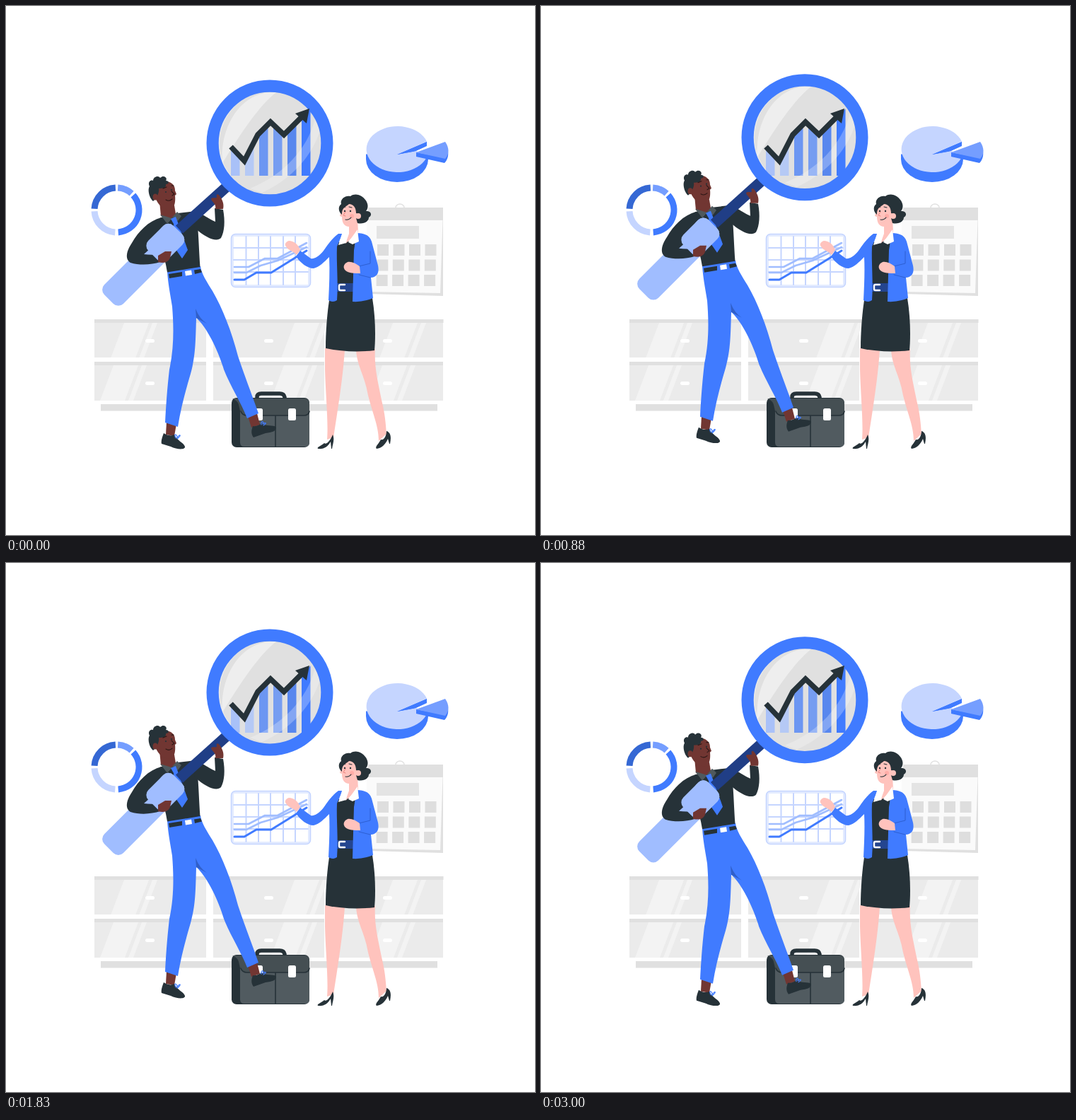
Write an HTML page that moves like this. It is 748 by 748 pixels and loops after 3040 ms.

```html
<!DOCTYPE html>
<html lang="en">
<head>
<meta charset="utf-8">
<title>Business analysis</title>
<style>
html, body { margin: 0; width: 100%; height: 100%; overflow: hidden; background: #fff; }
svg { display: block; width: 100vw; height: 100vh; }
.blue { fill: #407bff; }
.ink { fill: #263238; }
.tan { fill: #713632; }
.rose { fill: #ffc3bd; }
.line { fill: none; stroke-linecap: round; stroke-linejoin: round; }
</style>
</head>
<body>
<svg viewBox="0 0 748 748">
  <defs>
    <clipPath id="glass"><circle cx="373" cy="194" r="75"/></clipPath>
    <clipPath id="under"><path d="M318 199L337 219L356 182L374 164L393 182L431 145V240H318Z"/></clipPath>
  </defs>

  <g id="cabinet"></g>

  <g id="calendar">
    <path d="M551 285a6 5 0 0 1 12 0" class="line" stroke="#e0e0e0" stroke-width="1.5"/>
    <path d="M512 285H618V410L512 407Z" fill="#e0e0e0"/>
    <path d="M510 303H617.5L614 406L510 404Z" fill="#fafafa"/>
    <path d="M524 311H584V329H524Z" fill="#e4e4e4"/>
  </g>

  <g id="donut" class="line" stroke-width="9" style="stroke-linecap:butt"></g>

  <g id="pie">
    <path d="M509 209.500V216.500A44 32.500 0 0 0 597 216.500V209.500Z" class="blue"/>
    <path d="M553 210L595 192V199L566 210Z" class="blue"/>
    <path d="M553 210L595 191.500A44 32.500 0 1 0 597 208L580 205Z" fill="#c5d5ff"/>
    <path d="M553 210L595 192V198L580 205Z" class="blue"/>
    <path d="M580 205L595 198L598 203L597 210Z" fill="#fff"/>
    <path d="M580 207V213L620 222C624 218 626 212 625 206L619 214Z" class="blue"/>
    <path d="M580 207L621 192C627 201 627 209 621 216Z" fill="#759eff"/>
  </g>

  <g id="board" class="line">
    <rect x="318.5" y="322.5" width="112" height="75" rx="6" fill="#e3ebff" stroke="#c5d5ff" stroke-width="1.6"/>
    <rect x="322" y="326" width="105" height="68" fill="#fff"/>
    <path d="M339.500 326v68m17.500-68v68m17-68v68m18-68v68m17-68v68M322 342h105M322 359h105M322 376h105" stroke="#c5d5ff" stroke-width="2"/>
    <path d="M323 369H343L366 357H384L425 335M323 377H340L360 367L384 360L425 341" stroke="#a0bdff" stroke-width="2.6"/>
    <path d="M323 387H337L354 377H375L425 346" stroke="#407bff" stroke-width="3"/>
  </g>

  <g id="bag">
    <path d="M355 557V553Q355 548 361 548H387Q393 548 394 553V557" class="line" stroke="#263238" stroke-width="5.500"/>
    <rect x="319" y="554" width="110" height="70" rx="7" class="ink"/>
    <path d="M331 572H429V617Q429 623 423 623H337Q331 623 331 617Z" fill="#515b60"/>
    <path d="M320 555H422Q429 555 429 562V572Q428 579 421 579H339Q331 578 330 568Q329 558 320 555Z" fill="#454f53"/>
    <path d="M332 573Q334 579 341 579H421Q428 579 429 573M381 579V623" class="line" stroke="#263238" stroke-width="1.6"/>
    <rect x="352" y="569" width="11" height="17" rx="2.500" fill="#fff"/>
    <rect x="399" y="569" width="11" height="17" rx="2.500" fill="#fff"/>
  </g>

  <g id="man">
    <!-- feet and trousers -->
    <path d="M227 588L241 591L238 608L226 606Z" class="tan"/>
    <path d="M342 580L355 576L359 592L347 596Z" class="tan"/>
    <path d="M223 604C229 608 234 608 238 606C241 614 252 618 253 623C254 628 241 627 233 623L220 619C219 615 221 609 223 604Z" class="ink"/>
    <path d="M349 594C354 595 359 592 361 590C368 595 378 592 382 595C383 601 376 603 367 604L350 610C346 605 347 599 349 594Z" class="ink"/>
    <path d="M240 611C236 603 243 606 242 611C246 604 249 607 242 612M361 592C360 585 366 588 363 591C368 588 369 590 364 593" class="line" stroke="#407bff" stroke-width="1.2"/>
    <path d="M228 375L275 368C276 378 284 390 292 403C306 427 319 460 328 495C338 525 348 550 357 576L341 583C333 562 317 537 308 514C301 490 285 455 269 441C268 476 268 495 261 520C253 547 247 570 243 595L225 589C226 567 228 540 231 514C238 483 237 450 235 425C232 406 229 392 228 375Z" class="blue"/>
    <path d="M268 428Q274 443 284 449L269 441Z" fill="#305fc9"/>
    <path d="M230 379L249 376V382L231 385ZM266 373.500L275 372L277 376.500L267 379Z" class="ink"/>
    <path d="M253 375L262 373.500L263 380L254 381.500Z" fill="#fff"/>

    <!-- torso, neck and head -->
    <path d="M217 300L234 294L268 290C272 306 272 330 274.500 369L228 376.500C226 363 222 350 219 338Z" class="ink"/>
    <path d="M266 291C279 293 287 302 296 305L295 286L307 288C310 304 309 319 304 328C298 334 284 329 267 314Z" class="ink"/>
    <path d="M217 276L219 297L232 302L240 294L238 282Z" class="tan"/>
    <path d="M209 262C211 250 224 245 233 250C238 253 239 257 239 261L241 266L239 268C240 278 238 287 231 288C222 288 211 279 209 262Z" class="tan"/>
    <path d="M208 276C202 271 200 259 203 255C200 250 204 245 208 247C208 241 216 239 218 243C223 238 229 243 226 247C231 247 231 252 226 252C227 257 222 258 216 258C217 264 214 267 213 271Z" class="ink"/>
    <ellipse cx="211" cy="270" rx="3.500" ry="4.500" class="tan"/>
    <path d="M222 258L227 256M234 254L237 254M234 262L238 266L235 268M226 274Q231 277 235 273" class="line" stroke="#2b1716" stroke-width="1.1"/>
    <circle cx="226" cy="263" r="1.100" class="ink"/><circle cx="234" cy="260" r="1.100" class="ink"/>
    <path d="M218 295L234 300L242 291L248 297L243 304L236 299L228 308Z" fill="#4f595d"/>
    <path d="M233 301L240 298L243 306L257 345L249 357L240 344L237 308Z" class="blue"/>

    <!-- magnifier -->
    <path d="M245 316L316 252" stroke="#203e86" stroke-width="15"/>
    <rect width="138" height="38" y="-19" rx="10" transform="translate(243 317) rotate(135)" fill="#a0bdff"/>
    <g clip-path="url(#glass)">
      <circle cx="373" cy="194" r="75" fill="#ebebeb"/>
      <circle cx="376" cy="194" r="74" fill="#e0e0e0"/>
      <g id="bars"></g>
      <g fill="#fff">
        <path d="M306 222C302 169 334 119 382 122C358 141 334 177 306 222Z" opacity=".45"/>
        <path d="M345 258C390 240 425 205 437 160L444 176C432 215 400 247 362 264Z" opacity=".25"/>
      </g>
    </g>
    <circle cx="373" cy="194" r="80.900" fill="none" stroke="#407bff" stroke-width="17.200"/>
    <g id="trend">
      <path d="M318 199L337 219L356 182L374 164L393 182L423 152" fill="none" stroke="#263238" stroke-width="7.500"/>
      <path d="M429 145L425 166L409 152Z" class="ink"/>
    </g>

    <!-- arm and hands in front of the handle -->
    <path d="M220 299C201 304 187 319 178 335C170 347 168 358 176 363C189 367 206 366 218 362L217 351C210 352 202 352 195 351L217 331Z" class="ink"/>
    <rect width="50" height="38" y="-19" rx="10" transform="translate(243 317) rotate(135)" fill="#a0bdff"/>
    <path d="M215 353L225 347L234 347L232 356C229 363 223 364 215 362Z" class="tan"/>
    <path d="M296 287C298 280 291 277 290 273C291 270 295 272 298 271C297 267 298 265 301 267C305 272 309 279 307 287Z" class="tan"/>
  </g>

  <g id="woman">
    <path d="M451 484L479 486C477 518 471 560 463 610L454 613C456 590 452 550 451 514Z" class="rose"/>
    <path d="M495 486L522 485C520 512 528 540 531 557C536 577 537 591 538 605L527 615C527 592 517 574 511 546C507 523 496 508 495 486Z" class="rose"/>
    <path d="M462 606C465 613 462 619 461 626H460L459 616C455 623 450 627 441 626C439 624 446 622 450 618C453 621 459 614 462 606ZM538 601C544 603 545 609 543 619H542L540 612C536 621 531 625 524 626C521 624 527 619 530 613C534 615 538 608 538 601Z" class="ink"/>
    <path d="M468 402H496L518 413C522 437 523 465 521 487Q486 491 452 484C452 461 454 436 457 416Z" class="ink"/>
    <path d="M467 334L494 332L492 394H467Z" class="ink"/>
    <path d="M468 392H492V404H468Z" fill="#24458f"/>
    <path d="M479 394H473Q471 394 471 396V400Q471 402 473 402H479" class="line" stroke="#fff" stroke-width="2.400"/>

    <path d="M485 302L485 322L480 336L498 320L497 300Z" class="rose"/>
    <path d="M477 280C474 288 473 294 472 297L475 298C475 307 479 313 487 312C497 311 502 302 501 292C500 280 487 272 477 280Z" class="rose"/>
    <path d="M475 295C470 291 469 284 474 280C472 274 479 267 487 269C495 263 506 269 510 277C513 283 511 288 509 290C517 290 518 296 513 299C513 305 505 309 497 307L495 300C499 299 499 294 495 293C495 285 491 280 485 280C481 284 475 284 475 295Z" class="ink"/>
    <circle cx="498" cy="297" r="4" class="rose"/>
    <circle cx="479" cy="290" r="1.200" class="ink"/><circle cx="487" cy="290" r="1.200" class="ink"/>
    <circle cx="489" cy="297" r="3" fill="#ff9f99" opacity=".6"/>
    <path d="M477 285L480 284M485 284L489 285M480 302Q485 303 488 299" class="line" stroke="#263238" stroke-width="1.100"/>
    <path d="M480 291L477 296L480 297" class="line" stroke="#ed847e" stroke-width="1"/>

    <path d="M470 322C464 326 457 334 449 346C442 355 435 358 431 357L416 346L410 354C416 363 426 371 435 371C443 369 450 362 457 355C458 375 457 396 456 416Q462 420 468 416C470 390 467 363 468 340L476 322Z" class="blue"/>
    <path d="M496 321C506 321 514 324 517 333L526 367C528 377 525 383 516 384L519 413Q505 419 490 418L492 345Z" class="blue"/>
    <path d="M515 347L515 364L499 368M515 384L499 380" class="line" stroke="#2d5fd0" stroke-width="1"/>
    <path d="M476 319L484 313L481 335L470 338ZM484 334L497 316L499 333L490 337Z" fill="#fff"/>
    <path d="M416 345C413 337 407 332 400 332C396 333 393 337 396 340C398 345 406 346 411 352Z" class="rose"/>
    <path d="M500 368C494 364 489 361 483 362C477 365 476 370 480 374C484 378 493 378 501 378Z" class="rose"/>
  </g>
</svg>
<script>
const LOOP = 3040, PEAK = 1490, RISE = 14;
const $ = id => document.getElementById(id);
const rect = (x, y, w, h, fill, rx = 0) =>
  `<rect x="${x}" y="${y}" width="${w}" height="${h}" fill="${fill}" rx="${rx}"/>`;
const streak = (x, y, w, h) =>
  `<path d="M${x} ${y}h${w}l${-h * .38} ${h}h${-w}Z" fill="#f3f3f3"/>`;

function drawCabinet() {
  let s = rect(134, 563, 476, 9.5, '#e0e0e0');
  [125, 293, 461].forEach((x, i) => {
    const w = i ? 157 : 158, shine = [167, 408, 547][i];
    [[448, 49], [508, 50]].forEach(([y, h], row) => {
      const sx = shine - row * 15;
      s += rect(x, y, w, h, '#ebebeb') + streak(sx, y, 35, h) + streak(sx + 40, y, 7, h)
        + rect(x + 72, y + 23, 13, 5, '#fff', 2.5);
    });
    s += rect(x, 503, w, 5, '#e0e0e0');
  });
  $('cabinet').innerHTML = s + rect(125, 443, 493.5, 5, '#e0e0e0');
}

function drawCalendar() {
  let s = '';
  for (let r = 0; r < 3; r++)
    for (let c = 0; c < 4; c++)
      s += rect(525 + c * 22.5 - r * .7, 337 + r * 21.5, 16, 16, '#dedede');
  $('calendar').innerHTML += s;
}

function drawDonut() {
  const point = a => {
    const t = a * Math.PI / 180;
    return `${156.5 + 31.5 * Math.cos(t)} ${288.5 + 31.5 * Math.sin(t)}`;
  };
  $('donut').innerHTML = [
    [183, 267, '#3568d4'], [273, 312, '#759eff'], [318, 446, '#407bff'], [94, 177, '#c5d5ff']
  ].map(([a, b, color]) =>
    `<path d="M${point(a)}A31.500 31.500 0 0 1 ${point(b)}" stroke="${color}"/>`).join('');
}

function drawBars() {
  const colors = ['#a9c1f8', '#b5c9f5', '#6c96f2', '#769df1', '#5887ee', '#407bff'];
  $('bars').innerHTML = `<g clip-path="url(#under)">${
    colors.map((color, i) => rect(318 + i * 20, 140, 12.5, 100, color)).join('')}</g>`;
}

function frame(now) {
  const t = now % LOOP;
  const lift = RISE * (t < PEAK ? t / PEAK : (LOOP - t) / (LOOP - PEAK));
  $('man').setAttribute('transform', `translate(0 ${-lift})`);
  // The graph stays still behind the moving lens.
  for (const id of ['bars', 'trend'])
    $(id).setAttribute('transform', `translate(0 ${lift})`);
}

drawCabinet();
drawCalendar();
drawDonut();
drawBars();
const start = performance.now();
(function tick() {
  frame(performance.now() - start);
  requestAnimationFrame(tick);
})();
</script>
</body>
</html>
```
